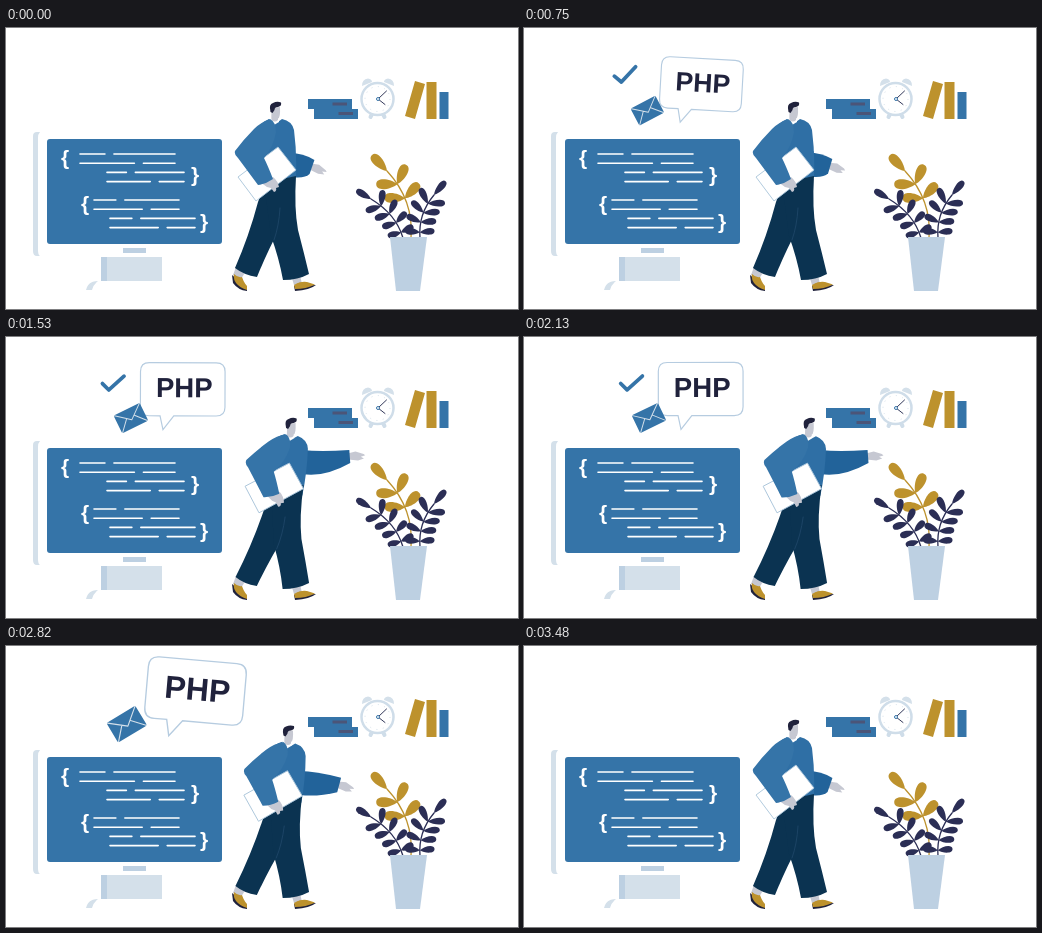
Animation of 512 by 281 pixels, one loop 3600 ms. Source, as an HTML page:

```html
<!DOCTYPE html>
<html lang="en">
<head>
<meta charset="utf-8">
<title>Developer scene</title>
<style>
html, body { margin: 0; width: 100%; height: 100%; overflow: hidden; background: #fff; }
svg { display: block; width: 100%; height: 100%; }
text { font: bold 21px "Liberation Sans", Arial, sans-serif; text-anchor: middle; }
.blue { fill: #3574a8; }
.gold { fill: #bd922d; }
.navy { fill: #2b2e55; }
.pale { fill: #d4e0ea; }
.mist { fill: #bdd0e2; }
.skin { fill: #c6c8d2; }
.ink { fill: #20223c; }
.line { fill: none; stroke-linecap: round; stroke-linejoin: round; }
</style>
</head>
<body>
<svg viewBox="0 0 512 281">
  <g id="desk">
    <path class="pale" d="M34 104H31Q27 104 27 108V223Q27 228 31 228H34Q32 227 32 222V110Q32 106 34 104Z"/>
    <rect class="blue" x="41" y="111" width="175" height="105" rx="3"/>
    <rect class="mist" x="117" y="220" width="23" height="5"/>
    <rect class="pale" x="95" y="229" width="61" height="24"/>
    <rect class="mist" x="95" y="229" width="6" height="24"/>
    <path class="pale" d="M80 262Q82 253 92 253Q87 257 86 262Z"/>
    <path id="code" class="line" stroke="#fff" stroke-width="1.6"/>
    <g fill="#fff">
      <text x="59" y="137">{</text><text x="189" y="154">}</text>
      <text x="79" y="182.500">{</text><text x="198" y="200.500">}</text>
    </g>
  </g>

  <g id="shelf">
    <path class="blue" d="M302 71H346V81H302ZM308 81H352V91H308ZM433.500 64H442.500V91H433.500Z"/>
    <path fill="#4b5578" d="M326.500 74.500H341V77.500H326.500ZM332.500 84H347V87H332.500Z"/>
    <path class="gold" d="M409 53L419 56L409 91L399 88ZM420.500 54H430.500V91H420.500Z"/>
    <path class="line" stroke="#cfdde9" stroke-width="4" d="M366 86L364.500 89M377 86L378.500 89"/>
    <path class="pale" d="M356 58Q356 51 362 50.500Q366 51 366 54ZM388 58Q388 51 382 50.500Q378 51 378 54Z"/>
    <circle cx="371.500" cy="71" r="16" fill="#fff" stroke="#cfdde9" stroke-width="2.500"/>
    <circle cx="371.500" cy="71" r="12.500" fill="none" stroke="#d4e0ea" stroke-dasharray="1 5.545"/>
    <path class="line" stroke="#34395a" d="M372 71L380.500 63M372 71L379 76.500"/>
    <circle cx="372" cy="71" r="1.500" fill="#fff" stroke="#3574a8"/>
  </g>

  <g id="plant"></g>
  <path class="mist" d="M384 209H421L414 263H390Z"/>

  <g id="person">
    <path class="skin" d="M230 239L240 243L235 251L227 247ZM285 247L294 247L296 256L288 257Z"/>
    <path class="ink" d="M226 247L241 259V263Q232 262 227 255ZM288 258L310 257Q304 262 289 263Z"/>
    <path class="gold" d="M228 246Q232 250 236 249Q238 255 241 258V262Q234 260 230 255Q227 251 228 246ZM288 257Q294 253 301 254L309 256.500Q300 261 289 261Z"/>
    <g id="hand"><path class="skin" d="M-2 -3L6 -4.500L14 -1.500L15.500 0L11 1L14 3L8 4.500L-2 3Z"/></g>
    <path id="sleeve" fill="#22639a"/>
    <g class="upper">
      <path fill="#2f6fa5" d="M263 91Q270 97 276 91Q286 93 288 102Q291 125 290 149Q276 156 260 155Q250 130 252 100Q256 94 263 91Z"/>
      <g id="head">
        <path fill="#fff" d="M263 91L265 89L273 90V94L268 97Z"/>
        <path class="skin" d="M266 80Q265 88 265.500 92Q269 95 272 92V90.500Q274.500 90 274 79Z"/>
        <path class="ink" d="M264.500 84Q262.500 76 267 75Q271 73 275 74.500Q276 78 272 79Q268.500 79 268.500 82L266.500 85Z"/>
      </g>
    </g>
    <g id="trousers" fill="#0b3351">
      <path d="M259 155Q280 165 274 200Q262 222 251 249Q238 247 229 240Q243 208 252 174Z"/>
      <path d="M258 155L290 148Q288 180 292 202Q298 225 303 246Q292 252 277 252Q273 230 265 208Z"/>
      <path class="line" stroke="#20486a" stroke-width=".8" d="M274 180Q273 198 268 212"/>
    </g>
    <g class="upper">
      <path fill="#fff" stroke="#a9c4da" stroke-width=".9" d="M232 149L272 119L290 142L250 173Z"/>
      <path class="skin" d="M254 154L267 149Q272 153 273 159L270 160Q271 163 268 164L265 160L261 159Z"/>
      <path class="blue" d="M264 91Q255 94 248 101Q238 111 229 123Q228 127 232 130L252 157Q260 156 267 151Q262 138 258 130Q268 118 270 104Q270 94 264 91Z"/>
    </g>
  </g>

  <g id="bubble">
    <path fill="#fff" stroke="#b6cce0" stroke-width="1.200" d="M-3 -14L0 0L11 -14H54Q63 -14 63 -23V-59Q63 -68 54 -68H-14Q-23 -68 -23 -59V-23Q-23 -14 -14 -14Z"/>
    <text class="ink" x="21.500" y="-33" style="font-size:28px">PHP</text>
  </g>
  <g id="mail">
    <rect class="blue" x="-14.750" y="-10" width="29.500" height="20" rx="1.500"/>
    <path class="line" stroke="#d4e0ea" d="M-14 -9.500L0 2L14 -9.500M-14 9.500L-4.500 -1M14 9.500L4.500 -1"/>
  </g>
  <g id="check">
    <path class="line" stroke="#3574a8" stroke-width="3.800" d="M-10.500 .5L-4 7L11.500 -7"/>
  </g>
</svg>
<script>
const LOOP = 3600, STEP = 30, DEG = 180 / Math.PI;
const el = id => document.getElementById(id);
const progress = (from, to, t) => Math.min(1, Math.max(0, (t - from) / (to - from)));
const smooth = (from, to, t) => {
  const x = progress(from, to, t);
  return x * x * (3 - 2 * x);
};
// Ease with a 14% overshoot
const back = x => 1 + 3.1 * (x - 1) ** 3 + 2.1 * (x - 1) ** 2;
const place = (node, transform) => node.setAttribute("transform", transform);

// Code on the screen: pairs of rows, each row split by a gap
el("code").setAttribute("d", [[74, 169], [101, 178], [88, 173], [104, 189]].map(([start, end], pair) =>
  [.31, .62].map((split, row) => {
    const y = 126 + 9.2 * row + 18.4 * pair + (pair > 1 ? 9.2 : 0);
    const gap = start + (end - start) * split;
    return `M${start} ${y}H${gap - 4.5}M${gap + 4.5} ${y}H${end}`;
  }).join("")).join(""));

const leaf = (x, y, angle, n, w) =>
  `<path transform="translate(${x} ${y}) rotate(${angle})"
    d="M0 0C${n * .3} ${-w} ${n} ${-w * 1.5} ${n} 0C${n} ${w * 1.5} ${n * .3} ${w} 0 0Z"/>`;

// Curved stem with a leaf at the end and pairs that open wider towards the root
function branch(cls, color, [x0, y0, cx, cy, x1, y1], pairs, size, width) {
  const on = (a, c, b, u) => (1 - u) ** 2 * a + 2 * u * (1 - u) * c + u * u * b;
  const slope = (a, c, b, u) => (1 - u) * (c - a) + u * (b - c);
  let leaves = "";
  for (let i = 0; i <= pairs; i++) {
    const u = 1 - .22 * i;
    const angle = Math.atan2(slope(y0, cy, y1, u), slope(x0, cx, x1, u)) * DEG;
    for (const side of i ? [-1, 1] : [0])
      leaves += leaf(on(x0, cx, x1, u), on(y0, cy, y1, u), angle + side * (48 + 9 * i), size - i * .8, width);
  }
  return `<path class="line" stroke="${color}" stroke-width="1.3" d="M${x0} ${y0}Q${cx} ${cy} ${x1} ${y1}"/>
    <g class="${cls}">${leaves}</g>`;
}

el("plant").innerHTML =
  branch("gold", "#bd922d", [405, 210, 408, 172, 381, 143], 2, 22, 5.2) +
  branch("navy", "#2b2e55", [397, 210, 390, 186, 365, 171], 4, 17, 3.6) +
  branch("navy", "#2b2e55", [414, 210, 412, 186, 428, 167], 4, 18, 3.6);

function drawPerson(t) {
  const lean = smooth(750, 1560, t) ** 2 - smooth(2600, 3420, t);
  const raise = smooth(700, 1200, t) - .37 * smooth(1200, 1530, t) - .63 * smooth(2130, 2820, t);

  for (const part of document.querySelectorAll(".upper")) place(part, `rotate(${9.3 * lean} 234 193)`);
  place(el("head"), `rotate(${-9.3 * lean} 269 93)`);
  place(el("trousers"), `translate(0 247) skewX(${-4.4 * lean}) translate(0 -247)`);

  // Sleeve from shoulder over elbow to wrist
  const sx = 284 + 12 * lean, sy = 137 - 19 * raise;
  const ex = 297 + 15 * lean + 6 * raise, ey = 138 - 16 * raise;
  const wx = 306 + 33 * lean + 8 * raise, wy = 139 - 31 * raise;
  const angle = Math.atan2(wy - ey, wx - ex) + .22;
  const half = 7.5 - 1.5 * raise, nx = -Math.sin(angle) * half, ny = Math.cos(angle) * half;
  el("sleeve").setAttribute("d", `M${sx} ${sy - 12}Q${ex} ${ey - 13} ${wx - nx} ${wy - ny}
    L${wx + nx} ${wy + ny}Q${ex + 2} ${ey + 13} ${sx} ${sy + 12}Z`);
  place(el("hand"), `translate(${wx} ${wy}) rotate(${angle * DEG})`);
}

// Pop in, sway to rest, swell and pop out
const popups = {
  bubble: { x: 157, y: 92.5, tilt: 0, swing: 4, shift: -1, push: 40, start: 150, end: 3150 },
  mail: { x: 125, y: 81, tilt: -26, swing: -2, shift: -2, push: -30, start: 210, end: 3150 },
  check: { x: 107, y: 46, tilt: 0, swing: -4, shift: -6, push: -30, start: 300, end: 2790 }
};

function drawPopups(t) {
  const sway = smooth(600, 750, t) * Math.exp((690 - t) / 300) * Math.cos((t - 750) / 450 * Math.PI);
  for (const id in popups) {
    const { x, y, tilt, swing, shift, push, start, end } = popups[id];
    const size = back(progress(start, start + 540, t)) * back(1 - progress(end - 600, end, t));
    const swell = Math.max(0, size - 1);
    const angle = tilt + swing * sway + Math.sign(push) * 35 * swell;
    place(el(id), `translate(${x + shift * sway + push * swell} ${y + 2 * sway - 20 * swell})
      rotate(${angle}) scale(${size * (.985 - .04 * sway + .1 * swell)})`);
  }
}

function tick() {
  const now = performance.now() % LOOP, t = now - now % STEP;
  drawPerson(t);
  drawPopups(t);
  requestAnimationFrame(tick);
}
tick();
</script>
</body>
</html>
```
